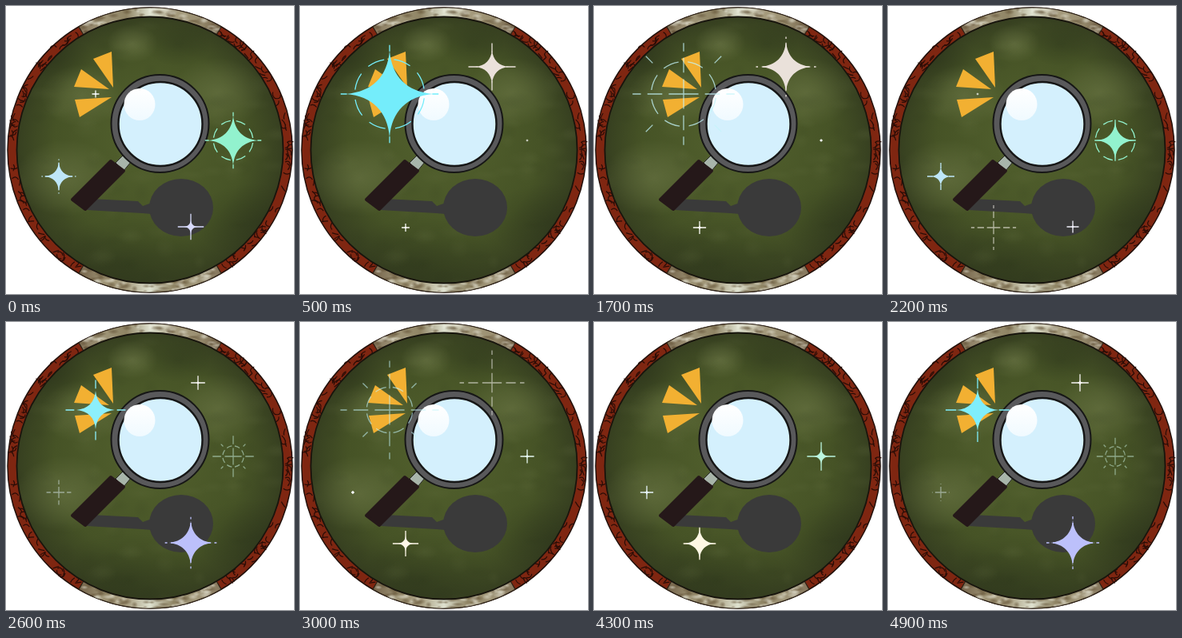
Animation of 360 by 360 pixels, one loop 5000 ms. Source, as an HTML page with a canvas:

```html
<!DOCTYPE html>
<html lang="en">
<head>
<meta charset="utf-8">
<title>Magnifier</title>
<style>
html, body { margin: 0; width: 100%; height: 100%; overflow: hidden; background: #fff; }
canvas { display: block; width: 100vw; height: 100vh; }
</style>
</head>
<body>
<canvas id="stage" width="360" height="360"></canvas>
<script>
const SIZE = 360, MID = 180, TAU = Math.PI * 2;
const LOOP = 5000, STEP = 100, CYCLE = 11.4;
const ctx = document.getElementById('stage').getContext('2d');

let seed = 17;
function rand(min = 0, max = 1) {
  seed = (seed * 16807) % 2147483647;
  return min + (max - min) * seed / 2147483647;
}

function paint(c, fill, stroke, width) {
  if (fill) { c.fillStyle = fill; c.fill(); }
  if (stroke) { c.strokeStyle = stroke; c.lineWidth = width; c.stroke(); }
}

function disc(c, x, y, rx, ry, fill, stroke, width) {
  c.beginPath();
  c.ellipse(x, y, rx, ry, 0, 0, TAU);
  paint(c, fill, stroke, width);
}

function poly(c, points, fill, stroke, width) {
  c.beginPath();
  points.forEach(([x, y]) => c.lineTo(x, y));
  c.closePath();
  paint(c, fill, stroke, width);
}

function cloud(c, x, y, rx, ry, rgb, alpha) {
  c.save();
  c.translate(x, y);
  c.scale(rx, ry);
  const g = c.createRadialGradient(0, 0, 0, 0, 0, 1);
  g.addColorStop(0, `rgba(${rgb},${alpha})`);
  g.addColorStop(0.5, `rgba(${rgb},${alpha * 0.55})`);
  g.addColorStop(1, `rgba(${rgb},0)`);
  disc(c, 0, 0, 1, 1, g);
  c.restore();
}

function drawField(c) {
  const light = '126,136,86', dark = '34,42,22';
  const g = c.createRadialGradient(MID, 160, 30, MID, MID, 168);
  g.addColorStop(0, '#505e2c');
  g.addColorStop(0.65, '#465326');
  g.addColorStop(1, '#363f20');
  c.save();
  disc(c, MID, MID, 166, 166, g);
  c.clip();
  [[158, 47, 32], [265, 108, 58], [95, 112, 52], [75, 215, 64]]
    .forEach(([x, y, r]) => cloud(c, x, y, r, r * 0.75, light, 0.4));
  [[60, 66, 48], [215, 48, 42], [310, 270, 75], [150, 325, 95]]
    .forEach(([x, y, r]) => cloud(c, x, y, r, r * 0.65, dark, 0.3));
  for (let i = 0; i < 110; i++) {
    cloud(c, rand(0, SIZE), rand(0, SIZE), rand(8, 22), rand(6, 14), i % 2 ? light : dark, 0.07);
  }
  c.restore();
}

function drawScribbles(c) {
  for (let i = 0; i < 130; i++) {
    c.save();
    c.translate(MID, MID);
    c.rotate((i % 2) * Math.PI + rand(-1.03, 1.03));
    c.translate(rand(168, 176), 0);
    c.rotate(rand(0, TAU));
    c.beginPath();
    c.moveTo(-4, 0);
    c.quadraticCurveTo(0, rand(-6, 6), 4, rand(0, 3));
    paint(c, null, '#2a0d07', 1.2);
    c.restore();
  }
}

function drawIvory(c, turn) {
  const half = Math.PI / 6, top = -Math.PI / 2;
  c.save();
  c.translate(MID, MID);
  c.rotate(turn);
  const g = c.createLinearGradient(-88, 0, 88, 0);
  ['#85765c', '#a09679', '#8f8464', '#dfe2d0', '#a69c7e', '#9b9072', '#75644b']
    .forEach((color, i, all) => g.addColorStop(i / (all.length - 1), color));
  c.beginPath();
  c.arc(0, 0, 178, top - half, top + half);
  c.arc(0, 0, 166, top + half, top - half, true);
  c.closePath();
  paint(c, g, '#2c2115', 1.2);
  c.clip();
  for (let i = 0; i < 50; i++) {
    const a = top + rand(-half, half), r = rand(166, 178);
    cloud(c, r * Math.cos(a), r * Math.sin(a), rand(3, 9), rand(2, 4),
      i % 2 ? '238,238,224' : '88,70,42', 0.5);
  }
  c.restore();
}

function drawRays(c) {
  const gold = '#f2b032';
  poly(c, [[109, 66], [132, 57], [134, 102]], gold);
  poly(c, [[94, 79], [129, 104], [85, 101]], gold);
  poly(c, [[86, 117], [132, 114], [92, 139]], gold);
}

function drawGlass(c) {
  const shade = '#3a3a3a', ink = '#161616';
  c.lineJoin = 'round';
  disc(c, 219, 252, 40, 36, shade);
  poly(c, [[106, 241], [165, 244], [171, 250], [182, 246], [182, 260], [170, 259], [101, 255]], shade);
  poly(c, [[146, 187], [156, 195], [147, 206], [137, 196]], '#a8b5aa', '#2b2a2a', 1);
  poly(c, [[131, 194], [147, 206], [99, 254], [83, 242]], '#251819', '#251819', 4);
  disc(c, 192.5, 147, 61, 61, '#59595b', ink, 2);
  disc(c, 193, 147.5, 52.5, 52.5, '#d4f0fd', ink, 2.4);
  const g = c.createLinearGradient(0, 104, 0, 143);
  g.addColorStop(0, '#ffffff');
  g.addColorStop(1, '#f0faff');
  disc(c, 167, 123, 19.5, 20, g);
}

function drawScene() {
  const layer = document.createElement('canvas');
  layer.width = layer.height = SIZE;
  const c = layer.getContext('2d');
  c.fillStyle = '#fff';
  c.fillRect(0, 0, SIZE, SIZE);
  disc(c, MID, MID, 178, 178, '#7f2611', '#21100a', 1.5);
  drawScribbles(c);
  drawIvory(c, 0);
  drawIvory(c, Math.PI);
  drawField(c);
  disc(c, MID, MID, 166.5, 166.5, null, '#17150d', 1.8);
  drawRays(c);
  drawGlass(c);
  return layer;
}

// Times are in steps; a star swells until `burst` (share of its life), then leaves a dashed cross.
const sparks = [
  { x: 112, y: 110, r: 58, start: -0.8, life: 9.5, rgb: [116, 237, 251], ring: true },
  { x: 240, y: 76, r: 38, start: 2, life: 6.2, rgb: [234, 225, 218] },
  { x: 284, y: 168, r: 33, start: 5, life: 10.4, rgb: [146, 242, 206], ring: true },
  { x: 66, y: 213, r: 22, start: 6.4, life: 8.7, rgb: [190, 230, 248] },
  { x: 231, y: 276, r: 32, start: -1, life: 5.9, rgb: [188, 192, 251], burst: 0.85, ease: 0.8 },
  { x: 132, y: 277, r: 26, start: 4.2, life: 7.1, rgb: [255, 248, 228], burst: 0.8, ease: 1.5 }
];

function starPath(r) {
  const far = r * 0.4, near = r * 0.05;
  ctx.beginPath();
  ctx.moveTo(0, -r);
  for (let i = 0; i < 4; i++) {
    const cos = Math.round(Math.cos(i * TAU / 4)), sin = Math.round(Math.sin(i * TAU / 4));
    const at = (x, y) => [x * cos - y * sin, x * sin + y * cos];
    ctx.bezierCurveTo(...at(near, -far), ...at(far, -near), ...at(r, 0));
  }
}

function spokes(from, to, turn) {
  ctx.beginPath();
  for (let i = 0; i < 4; i++) {
    const a = turn + i * TAU / 4, x = Math.cos(a), y = Math.sin(a);
    ctx.moveTo(x * from, y * from);
    ctx.lineTo(x * to, y * to);
  }
  ctx.stroke();
}

function drawRing(r) {
  ctx.setLineDash([r * 0.5, r * 0.2854]);
  ctx.beginPath();
  ctx.arc(0, 0, r, 0.12, 0.12 + TAU);
  ctx.stroke();
}

function drawSpark({ x, y, r, start, life, rgb, ring, burst = 0.63, ease = 2.2 }, step) {
  const u = ((step - start) % CYCLE + CYCLE) % CYCLE / life;
  if (u >= 1) return;
  const grow = Math.min(1, u / burst) ** ease;
  const fade = Math.max(0, (u - burst) / (1 - burst));
  const whole = fade === 0;
  const tone = whole ? Math.min(1, grow / 0.5) : 0.4;
  const arm = r * 1.1 * grow ** 0.6 * (1 - fade ** 6);

  ctx.save();
  ctx.translate(x, y);
  ctx.fillStyle = ctx.strokeStyle = `rgb(${rgb.map(v => Math.round(250 + (v - 250) * tone))})`;
  ctx.globalAlpha = whole ? 1 : 0.8 - 0.35 * fade;
  ctx.lineWidth = 1.3;
  if (!whole || grow > 0.4) ctx.setLineDash([r * 0.32, r * 0.14]);
  spokes(0, arm, 0);
  if (ring && grow > 0.5) {
    const size = r * (0.75 - 1.2 * Math.max(0, u - burst));
    drawRing(size);
    ctx.setLineDash([]);
    if (!whole) spokes(size * 1.35, size * 1.65, TAU / 8);
  }
  if (whole) {
    starPath(Math.max(2, r * grow));
    ctx.fill();
  }
  ctx.restore();
}

const scene = drawScene();

function render() {
  const step = Math.floor(performance.now() % LOOP / STEP);
  ctx.drawImage(scene, 0, 0);
  sparks.forEach(spark => drawSpark(spark, step));
  requestAnimationFrame(render);
}
render();
</script>
</body>
</html>
```
